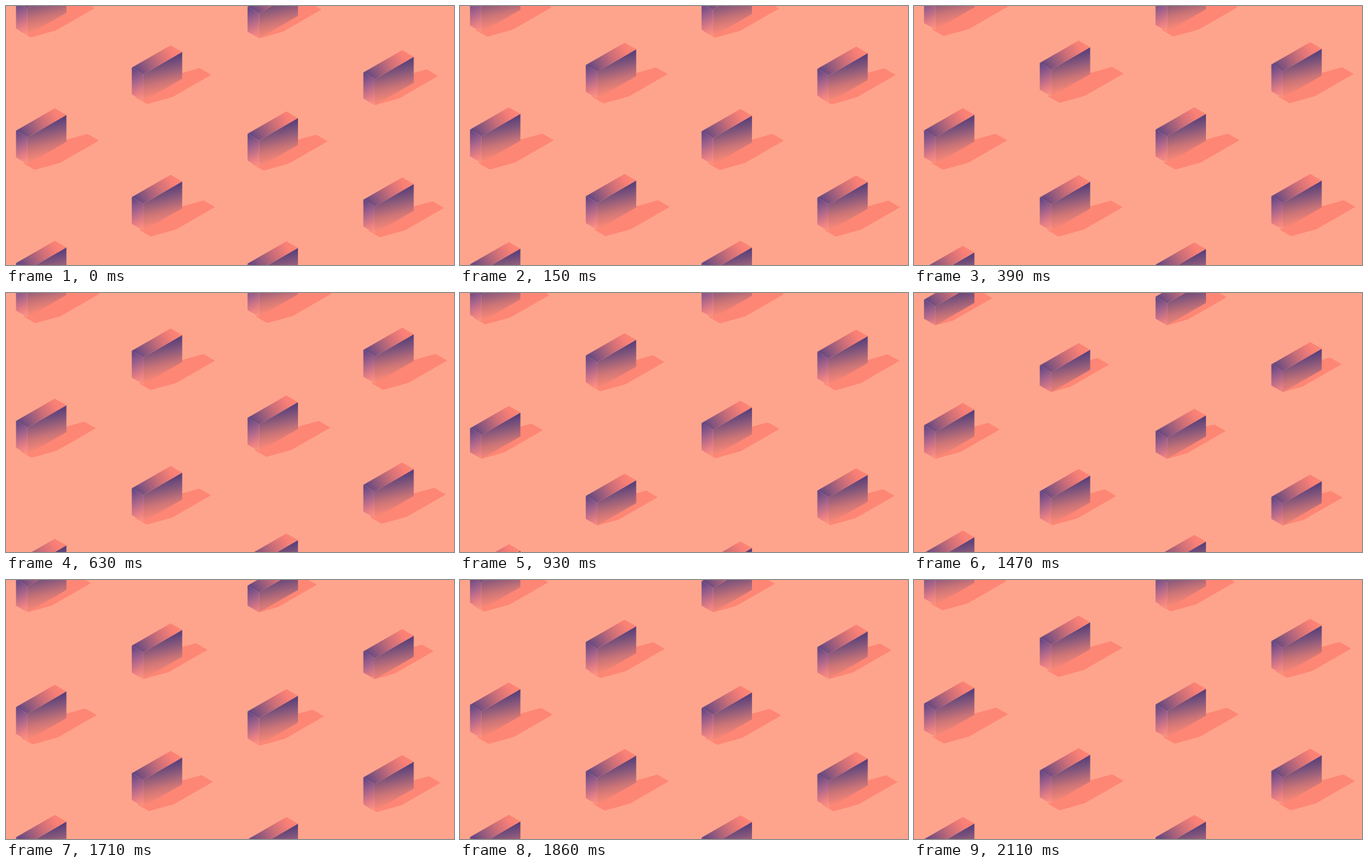
An HTML page with a canvas that plays this animation: 640 px wide and 371 px high, repeating every 2210 ms.

```html
<!DOCTYPE html>
<html lang="en">
<head>
<meta charset="utf-8">
<title>Rising blocks</title>
<style>
html, body { margin: 0; width: 100%; height: 100%; overflow: hidden; background: #ffa48c; }
canvas { display: block; }
</style>
</head>
<body>
<canvas id="stage" width="640" height="371"></canvas>
<script>
const ctx = document.getElementById('stage').getContext('2d');
const LOOP = 2210;
const STEPS = [0, 150, 270, 390, 510, 630, 780, 930, 1050, 1170, 1320, 1470, 1590, 1710, 1860, 1980, 2110];
const BODY = 38.5;          // full height of a block
const PERIOD = 1880;        // one rise and fall

// Footprint corners, relative to the front corner
const FRONT = [0, 0], LEFT = [-16.5, -9.5], RIGHT = [55.5, -32], BACK = [39, -41.5];
const SUN = [0.94, -0.26];  // shadow shift per pixel of height

function gradient(from, dx, dy, stops) {
  const g = ctx.createLinearGradient(from[0], from[1], from[0] + dx, from[1] + dy);
  stops.forEach(([at, color]) => g.addColorStop(at, color));
  return g;
}

const topFill = gradient(LEFT, 61, -35, [[0, '#5c4381'], [0.2, '#86557e'], [0.55, '#cc6e78'], [0.85, '#f87f76'], [1, '#fd8574']]);
const leftFill = gradient(LEFT, 22, 45, [[0, '#584284'], [0.4, '#a5638a'], [0.75, '#e97f83'], [1, '#ff9683']]);
const rightFill = gradient(RIGHT, 12.3, 54.6, [[0, '#513b79'], [0.3, '#83567b'], [0.65, '#cb7477'], [1, '#fd8a77']]);

function polygon(points, fill) {
  ctx.beginPath();
  points.forEach(([x, y]) => ctx.lineTo(x, y));
  ctx.closePath();
  ctx.fillStyle = fill;
  ctx.fill();
}

const down = ([x, y], d) => [x, y + d];
const cast = ([x, y], height) => [x + SUN[0] * height, y + SUN[1] * height];

function drawBlock(col, row, t) {
  const lowest = 1417 + 103 * col - 136 * row;
  const top = 25 + 26 * Math.abs(Math.sin(Math.PI * (t - lowest) / PERIOD));
  const lift = Math.max(0, top - BODY);
  const side = top - lift;

  ctx.save();
  ctx.translate(30.8 + 165.4 * col, 46.3 + 95.6 * row);
  polygon([
    cast(LEFT, lift), cast(FRONT, lift), cast(FRONT, top),
    cast(RIGHT, top), cast(BACK, top), cast(BACK, lift)
  ], '#fe8674');

  ctx.translate(0, -top);
  polygon([LEFT, FRONT, down(FRONT, side), down(LEFT, side)], leftFill);
  polygon([FRONT, RIGHT, down(RIGHT, side), down(FRONT, side)], rightFill);
  polygon([LEFT, FRONT, RIGHT, BACK], topFill);
  ctx.restore();
}

function draw(now) {
  const time = now % LOOP;
  const t = STEPS.filter(s => s <= time).pop();
  ctx.fillStyle = '#ffa48c';
  ctx.fillRect(0, 0, 640, 371);
  for (let row = 0; row < 5; row++) {
    for (let col = row % 2; col < 4; col += 2) drawBlock(col, row, t);
  }
}

const start = performance.now();
function tick() {
  draw(performance.now() - start);
  requestAnimationFrame(tick);
}
tick();
</script>
</body>
</html>
```
